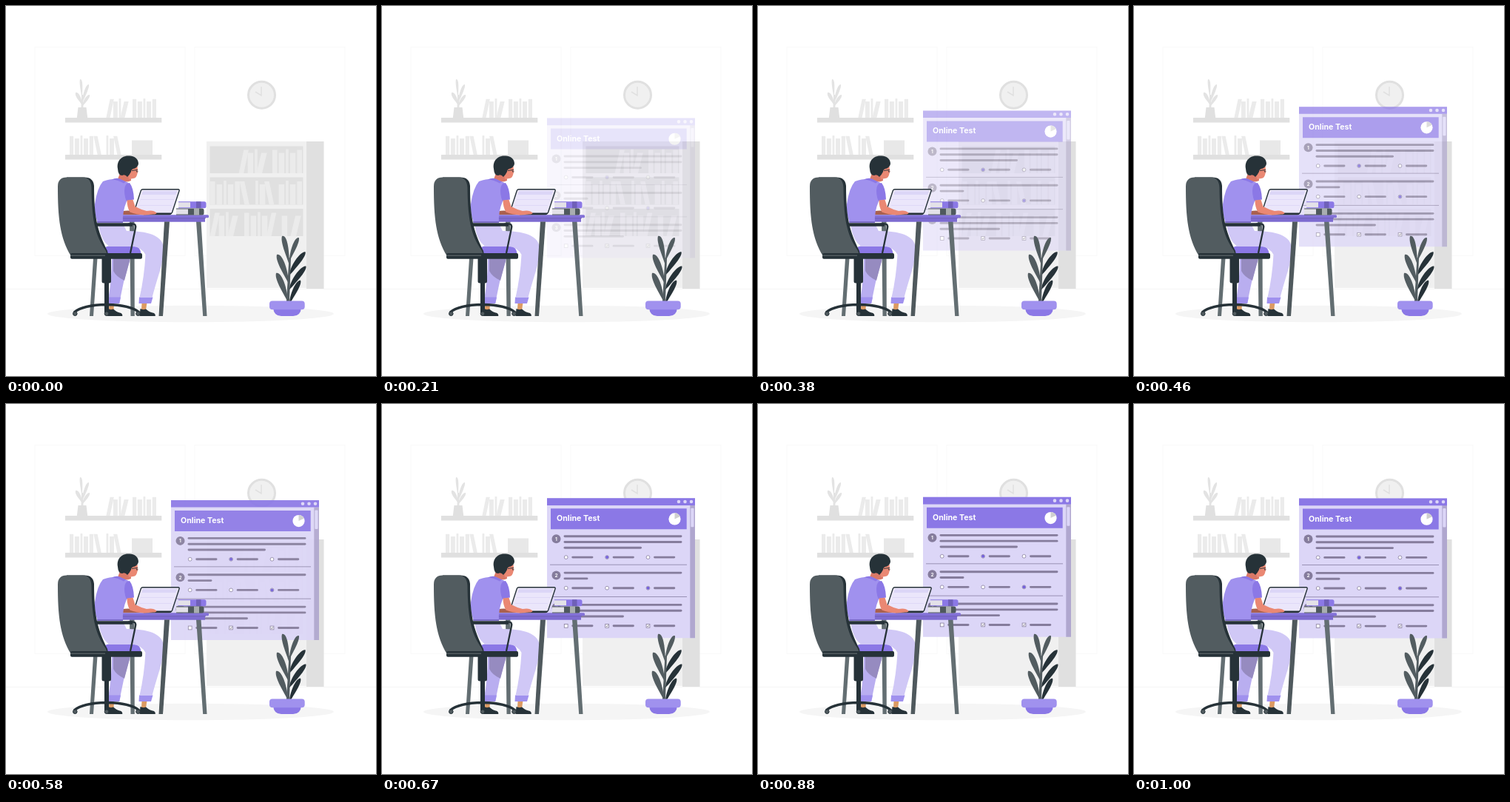
An HTML page for the animation above (1040 ms loop, 500 by 500 pixels).

```html
<!DOCTYPE html>
<html lang="en">
<head>
<meta charset="utf-8">
<title>Online test</title>
<style>
html, body { margin: 0; width: 100%; height: 100%; overflow: hidden; background: #fff }
svg { display: block; width: 100vw; height: 100vh }
text { font: 700 10.6px Inter, "Open Sans", sans-serif; fill: #fff }
.num { font-size: 6.5px; text-anchor: middle }
.line { fill: none; stroke: #857c9c; stroke-width: 2.9; stroke-linecap: round }
</style>
</head>
<body>
<svg viewBox="0 0 500 500">
  <!-- room -->
  <g fill="none" stroke="#f9f9f9">
    <rect x="39" y="55.5" width="203" height="282"/>
    <rect x="255" y="55.5" width="203" height="282"/>
    <path d="M0 382.5H500" stroke="#f5f5f5"/>
  </g>
  <ellipse cx="249.5" cy="416" rx="193.5" ry="11.3" fill="#f5f5f5"/>
  <path d="M80 151h130.300v6.500H80zM80 201h130.300v6.500H80zM97.500 137h11l1.700 14H95.800z" fill="#e0e0e0"/>
  <path d="M170 181.500h28V201h-28z" fill="#e8e8e8"/>
  <g id="sprig" fill="#e3e3e3"></g>
  <path d="M271 183h135v198H271z" fill="#f0f0f0"/>
  <path d="M406 183h23.500v199H406zM275.500 189.500h126v36.500h-126zM275.500 231.500h126v37h-126zM275.500 274h126v37h-126z" fill="#e0e0e0"/>
  <g id="books" fill="#ebebeb"></g>
  <g stroke="#e0e0e0" fill="none">
    <circle cx="345.5" cy="120.300" r="18" fill="#f0f0f0" stroke-width="3"/>
    <path d="M345 109V121L337 116" stroke-width="1.5"/>
  </g>

  <!-- test window -->
  <g id="panel">
    <path d="M223 127.500h200v189H223z" fill="#dcd6f7"/>
    <path d="M416.300 137H423v179.500h-6.700z" fill="#b0a7cf"/>
    <rect x="417.300" y="141" width="4.200" height="25.500" rx="1" fill="#dcd6f7"/>
    <path d="M223 127.500h200v9.700H223zM228 141.500h183.700v28H228z" fill="#8b78e6"/>
    <path d="M401 132.300h0M409.500 132.300h0M418 132.300h0" stroke="#dcd6f7" stroke-width="4.600" stroke-linecap="round"/>
    <circle cx="395.500" cy="155.700" r="8.100" fill="#fff"/>
    <path d="M395.500 155.700V147.600A8.100 8.100 0 0 1 402.800 152.200Z" fill="#cfcfcf"/>
    <text x="236" y="158.600">Online Test</text>
    <path d="M227 217.500H412M227 260.800H412" stroke="#9188ad" stroke-width=".9"/>
    <g id="questions"></g>
  </g>

  <!-- desk -->
  <path d="M118 341h5.500L118 419h-5zM167 291h6.500l.3 128h-5.300zM257 291h6.500l8 128h-5.300z" fill="#636e72"/>
  <path d="M157 285h112v6.700H157z" fill="#7d6bd0"/>
  <rect x="155" y="282.300" width="119" height="3.900" rx="1.5" fill="#8371d8"/>
  <path d="M156 286.700H270" stroke="#6f60b8"/>

  <!-- desk books -->
  <path d="M233 264.500h17v8h-17zM230 274h17v8h-17z" fill="#e3e1e8"/>
  <path d="M233 264.300h35q2.500 0 2.500 2.500v4q0 2.500-2.500 2.500h-35v-1h16v-7h-16z" fill="#8b78e6"/>
  <path d="M257 264.300h6.500v9H257z" fill="#6f60b8"/>
  <path d="M230 273.500h35q2.500 0 2.500 2.500v4q0 2.500-2.500 2.500h-35v-1h16v-7h-16z" fill="#4f595d"/>
  <path d="M254 273.500h7v9h-7z" fill="#a9aeb0"/>

  <!-- laptop -->
  <path d="M185 247.700H232.500Q234.800 247.700 234 250L224.500 279Q223.500 281.300 221 281.300H172L182.300 249.500Q183 247.700 185 247.700Z" fill="#ebe6fb" stroke="#263238" stroke-width="1.4"/>
  <path d="M185 250.300H231L229.300 255H183.500Z" fill="#dcd6f7"/>
  <path d="M182 261.500H227M180 269.500H224" stroke="#dcd6f7" stroke-width=".8"/>
  <path d="M186 279.500H224Q223.500 282.300 221 282.300H186Z" fill="#263238"/>

  <!-- person -->
  <path d="M143 341H168L159 373 154 397H138Q143 370 143 341Z" fill="#b9aef0"/>
  <path d="M145 341H168L160 371Q149 366 145 358Z" fill="#968bc0"/>
  <path d="M139.500 401h6.500l-.5 10h-6.500zM183.500 401h7l-1.500 10h-6z" fill="#dc9a63"/>
  <path d="M138 409Q141 411 145 409.500 150 414 155.500 415 157.800 416.500 157.300 419H137ZM181.500 409Q185 411 189 409.500 194 414 200 415 202.300 416.500 201.800 419H180.500Z" fill="#263238"/>
  <path d="M138.500 393.500H155L153.300 402H137.500ZM180 393.500H198.500L196 402H179.500Z" fill="#a091ee"/>
  <path d="M133 334V328.500Q134 324.500 140 324.500H174Q181 325 182.500 334Z" fill="#8b78e6"/>
  <path d="M125 294H158L163 304C180 304 213 306 213 328Q213 342 207 361 200 384 197.500 394H180.500Q187 365 188.500 336 183 326 172 325H140Q128 318 125 294Z" fill="#d0c8f6"/>
  <path d="M157 277.500Q166 275 178 279L184 282H157Z" fill="#a9604f"/>
  <path d="M154 226L168 224 169 236Q160 240 151 234Z" fill="#d97867"/>
  <path d="M163 217H177.500L178.300 224 177.300 227Q176.500 232.500 172 233L166 234Z" fill="#ea8873"/>
  <path d="M151 220C149 208 158 202 166 202.600 172 202 179 206 179 213Q178.500 217 174 219.500 169 220 169 224 167 228 164 231 161 227 157 229 151.500 229 151 220Z" fill="#263238"/>
  <path d="M170 222.500L178 221.300M176 222.500q.5 3 2.300 1" fill="none" stroke="#263238" stroke-width=".9"/>
  <path d="M131 237Q143 233 151 234L164 238Q171 244 172 261L163 264Q157 278 158 293H124Q119 280 120 268 123 246 131 237Z" fill="#a091ee"/>
  <path d="M143 234.500Q149 231.500 154 233.500L162 237.500 159 239.500Q151 235 143 234.500ZM160.500 245Q162 239 167 239 172.500 246 173 261.500L162.500 263Q159 254 160.500 245Z" fill="#8b78e6"/>
  <path d="M163.500 262.500L171.500 261.700 174.500 271Q182 275 190 277 199 275 203.500 279.500 203.500 281.500 199 281.500L187 282.600Q176 282 167.500 278.500 163.500 272 163.500 262.500Z" fill="#ea8873"/>
  <path d="M123 292H158" stroke="#6f60b8" stroke-width="1.5"/>
  <path d="M214 291.500h7L212 419h-5.500z" fill="#4f595d"/>

  <!-- chair -->
  <path d="M82 231.500H106Q118 231.500 119 243C119 284 123 303 137 331L139 341H89L100 300Z" fill="#263238"/>
  <path d="M70 244Q70 231.500 82 231.500H104Q114.500 231.500 115.500 245C116 288 120 309 134.500 330Q139 337.500 130 338H88C73 314 70 286 70 244Z" fill="#525c60"/>
  <rect x="87" y="334" width="97" height="7.700" rx="2" fill="#263238"/>
  <path d="M87 337.300H134" stroke="#525c60" stroke-width="1.5"/>
  <g fill="none" stroke="#263238">
    <path d="M122 295.500H171" stroke-width="4.500"/>
    <path d="M165 294.700H172Q176 295 175 300L168 334" stroke-width="2.300"/>
    <path d="M92 414Q104 404 136 403.500 168 404 180 414" stroke-width="3.500"/>
  </g>
  <path d="M129.500 341h12.500v31q0 2.500-2.500 2.500h-7.500q-2.500 0-2.500-2.500zM133 374h6v40h-6z" fill="#263238"/>
  <g fill="#525c60" stroke="#263238">
    <circle cx="93.300" cy="415.700" r="2.800"/><circle cx="136" cy="415.700" r="2.800"/><circle cx="178.500" cy="415.700" r="2.800"/>
  </g>

  <!-- plant -->
  <g id="plant" fill="#525c60"></g>
  <path d="M361 408H399Q398 419 388 419H372Q362 419 361 408Z" fill="#8b78e6"/>
  <rect x="356" y="398.500" width="47.700" height="11.700" rx="4" fill="#a091ee"/>
</svg>
<script>
const $ = id => document.getElementById(id);
const path = (d, extra = '') => `<path d="${d}" ${extra}/>`;

// A run has five slots: upright "|", leaning "/" or "\", empty ".".
// Every third book is thin and tall, its neighbours wide and short.
function run(x, floor, scale, slots) {
  let out = '', at = x;
  [...slots].forEach((kind, i) => {
    const thin = i === 2, wide = i % 2;
    const w = scale * (thin ? 3.5 : wide ? 7.5 : 6.5);
    const h = scale * (thin ? 32.5 : wide ? 27.5 : 31.5);
    const lean = scale * 3.3 * ((kind === '/') - (kind === '\\'));
    if (kind !== '.') out += path(`M${at - lean} ${floor}h${w}l${2 * lean} ${-h}h${-w}z`);
    at += w + scale * 2.1;
  });
  return out;
}
$('books').innerHTML =
  run(138, 151, .8, '/||/.') + run(171, 151, .8, '|||||') +
  run(86, 201, .8, '|||||') + run(121, 201, .8, '\\.||\\') +
  run(318, 226, 1, '/||/.') + run(360, 226, 1, '|||||') +
  run(276, 268.5, 1, '|||||') + run(319, 268.5, 1, '\\.||\\') + run(360, 268.5, 1, '.||||') +
  run(279, 311, 1, '/||/.') + run(322, 311, 1, '||||/') + run(364, 311, 1, '.|./.');

// Slim leaf curving up from its base, fullest near the tip.
function leaf(x, y, tx, ty, w, extra) {
  const dx = tx - x, dy = ty - y, s = Math.sign(dx);
  return path(`M${x} ${y}C${x} ${y + dy * .4} ${tx - s * w} ${ty - w * .3} ${tx} ${ty}` +
    `C${tx + s * w * .3} ${ty + w} ${x + dx * .45} ${y + dy * .35} ${x} ${y}Z`, extra);
}

let sprig = path('M102 120h2l.5 17h-3z');
for (let i = 0; i < 2; i++) {
  sprig += leaf(103, 127 + 7 * i, 100 - 6 * i, 99 + 18 * i, 5);
  sprig += leaf(103, 131 + 5 * i, 112 + i, 106 + 14 * i, 4);
}
$('sprig').innerHTML = sprig;

let plant = '';
for (let i = 3; i >= 0; i--) {
  const y = 313 + 19.3 * i;
  plant += leaf(383, y + 32, 406 - 4 * (i - 1.6) ** 2, y, 6, i ? 'fill="#263238"' : '');
}
for (let i = 0; i < 3; i++) {
  const y = 311 + 25 * i;
  plant += leaf(383 - i, y + 39, 373 - 10 * i + 3 * i * i, y, 8);
}
$('plant').innerHTML = plant + path('M382.5 340h2.500l-2 59h-4z');

const rule = (x1, x2, y) => path(`M${x1} ${y}H${x2}`, 'class="line"');

function question(n, y, ends, picked, square) {
  let out = `<circle cx="235.5" cy="${y + 3.5}" r="6" fill="#857c9c"/><text class="num" x="235.5" y="${y + 5.9}">${n}</text>`;
  ends.forEach((end, i) => out += rule(247, end, y + i * 7.8));
  const oy = y + ends.length * 7.8 + 5;
  for (let i = 0; i < 3; i++) {
    const x = 248.7 + i * 55.4;
    out += `<rect x="${x - 2.4}" y="${oy - 2.4}" width="4.8" height="4.8" rx="${square ? 0 : 2.4}" fill="#fff" stroke="#857c9c" stroke-width=".8"/>`;
    if (picked.includes(i)) out += square
      ? path(`M${x - 1.3} ${oy}l1 1.2 1.7-2.4`, 'fill="none" stroke="#6b627f" stroke-width=".8"')
      : `<circle cx="${x}" cy="${oy}" r="2" fill="#7460dc"/>`;
    out += rule(x + 9, x + 35.3, oy);
  }
  return out;
}
$('questions').innerHTML =
  question(1, 179, [404, 404, 349.5], [1]) +
  question(2, 228.4, [404, 277], [2]) +
  question(3, 271.7, [404, 404, 325.5], [1, 2], true);

// Overshooting ease: cubic-bezier(.36, -.01, .5, 1.38)
const bez = (a, b, s) => 3 * a * s * (1 - s) ** 2 + 3 * b * s * s * (1 - s) + s ** 3;
function ease(x) {
  if (x >= 1) return 1;
  let lo = 0, hi = 1;
  for (let i = 0; i < 24; i++) {
    const mid = (lo + hi) / 2;
    if (bez(.36, .5, mid) < x) lo = mid; else hi = mid;
  }
  return bez(-.01, 1.38, lo);
}

const LOOP = 1040, FPS = 24;
function draw(now) {
  const tick = Math.min(FPS, Math.floor((now % LOOP + 4) * FPS / 1000));
  const p = tick < 3 ? 0 : ease((tick + .6) / FPS);
  $('panel').setAttribute('transform', `translate(0 ${30 * (1 - p)})`);
  $('panel').setAttribute('opacity', Math.min(1, p));
}
const start = performance.now();
function loop() {
  draw(performance.now() - start);
  requestAnimationFrame(loop);
}
loop();
</script>
</body>
</html>
```
